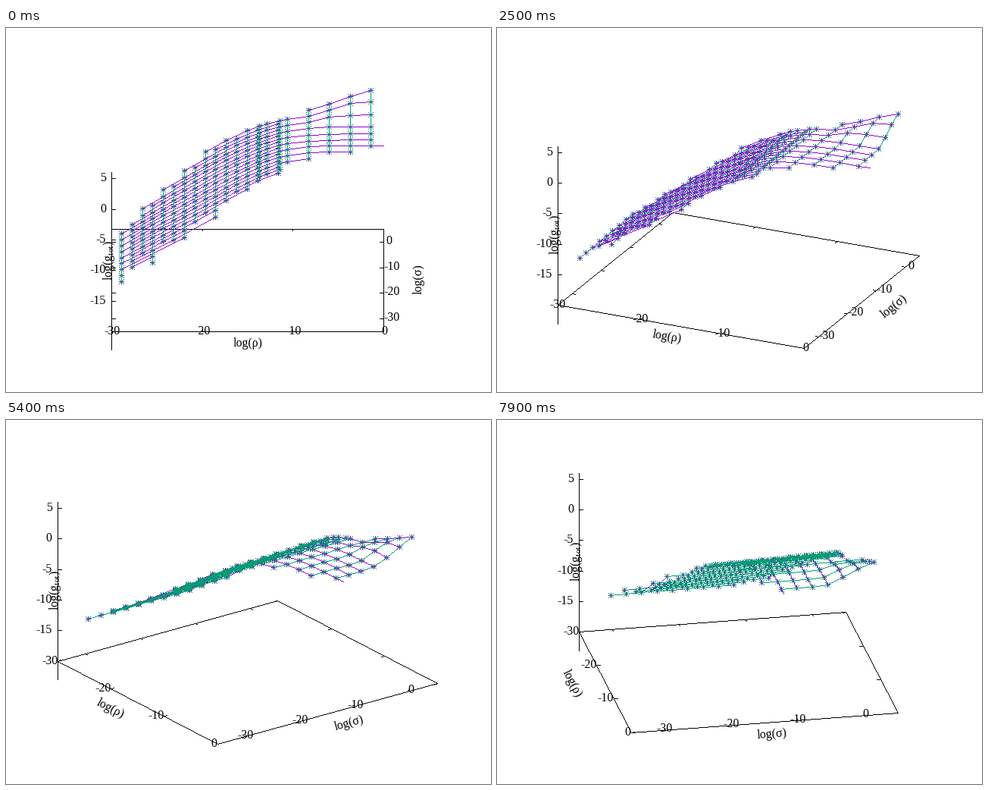
A matplotlib script that plays this animation: 640 px wide and 480 px high, repeating every 8000 ms.

```python
import numpy as np
import matplotlib.pyplot as plt
from matplotlib.animation import FuncAnimation

plt.rcParams.update({
    "font.family": "Liberation Serif",
    "font.size": 11.52,
    "mathtext.fontset": "custom",
    "mathtext.rm": "Liberation Serif",
})

W, H, DPI = 640, 480, 100
FRAMES, INTERVAL = 80, 100
BLACK, PURPLE, GREEN = (0, 0, 0), (148, 0, 211), (0, 158, 115)

CX, CY = 318.5, 332.5      # centre of the base square
RX, RY = 179.5, 67.5       # half side, and half side after the tilt
ZUNIT = 8.06               # pixels per unit of height
X0, STEP = 152, 13.83      # first column and column spacing at angle zero
TICK = 5 / RX


def row_v(j):
    return 0.835 - 0.1151 * j


def height(x, j):
    """Ramp that levels off along rho, plus a rise in the far corner."""
    n, v = (x - X0) / STEP, row_v(j)
    s = 13
    ramp = 168 - s * np.log1p(np.exp((116 - 7.9 * n) / s))
    tilt = 10 * (v - 0.1) * np.exp(-((n - 8) / 6) ** 2)
    by_sigma, by_rho, s = 28.5 - 9.6 * j, 0.363 * (x - 400) - 1.5, 2.5
    rise = s * np.log1p(1 / (np.exp(-by_sigma / s) + np.exp(-by_rho / s)))
    return ramp + tilt + rise


def row_range(x, shift):
    """Sigma rows covered by a column; the low edge is ragged."""
    n = (x - X0) / STEP
    ragged = 1.6 * np.cos(2 * np.pi * n / 3) * np.exp(-(n / 10) ** 2)
    first = max(int(n < 17), round(5.5 - 0.53 * n))
    last = round(12.7 - 0.27 * n + ragged)
    return np.arange(first, last + 1) + shift


# Three overlapping sets of columns; odd ones of the first sit half a row off
columns = [(X0 + STEP * k, k % 2 / 2) for k in [*range(14), 15]]
columns += [(481 - 27.4 * k, 0) for k in range(6)]
columns += [(361 - 27.5 * k, 0) for k in range(2)]

col_lines, rows = [], {}
for x, shift in sorted(columns):
    col = [((x - CX) / RX, row_v(j), height(x, j)) for j in row_range(x, shift)]
    col_lines.append(np.array(col))
    for j, p in zip(row_range(x, shift), col):
        rows.setdefault(j, []).append(p)
rows[6].append((1, row_v(6), rows[6][-1][2]))   # runs on to rho = 0
row_lines = [np.array(r) for r in rows.values()]
nodes = np.concatenate(col_lines)


def project(u, v, h, a):
    c, s = np.cos(a), np.sin(a)
    return np.array([CX + RX * (u * c + v * s), CY + RY * (u * s - v * c) - h])


def stroke(img, p, q, color):
    """Hard one-pixel line."""
    p, q = np.rint(p), np.rint(q)
    n = int(max(abs(q - p))) + 1
    x, y = np.rint(np.linspace(p, q, n)).astype(int).T
    img[y, x] = color


def polylines(img, lines, color, a):
    for line in lines:
        pts = project(*line.T, a).T
        for p, q in zip(pts, pts[1:]):
            stroke(img, p, q, color)


def marks(img, arms, color, a):
    x, y = np.rint(project(*nodes.T, a)).astype(int)
    for dx, dy in arms:
        for r in range(-3, 4):
            img[y + r * dy, x + r * dx] = color


fig = plt.figure(figsize=(W / DPI, H / DPI), dpi=DPI, facecolor="white")
ax = fig.add_axes([0, 0, 1, 1])
ax.axis("off")
canvas = ax.imshow(np.full((H, W, 3), 255, np.uint8), aspect="auto",
                   interpolation="nearest")


def label(s, ha="center"):
    return ax.text(0, 0, s, ha=ha, va="baseline", rotation_mode="anchor")


def tick_text(n):
    return f"{n}" if n < 0 else f" {n}"


x_ticks = [(n / 15 + 1, label(tick_text(n))) for n in range(-30, 1, 10)]
y_ticks = [((n + 15) / 20, label(tick_text(n))) for n in range(-30, 1, 10)]
z_ticks = [((n + 20) * ZUNIT, label(str(n), "right")) for n in range(-15, 6, 5)]
x_title, y_title = label("log(ρ)"), label("log(σ)")
z_title = label(r"$\mathrm{log(g_{tot})}$")
z_title.set_rotation(90)


def place_title(text, x, y, angle):
    text.set_position((x + 4 * np.sin(angle), y + 4 * np.cos(angle)))
    text.set_rotation(np.degrees(angle))


def update(i):
    a = np.radians(i)
    c, s = np.cos(a), np.sin(a)
    img = np.full((H, W, 3), 255, np.uint8)

    def base_line(u0, v0, u1, v1):
        stroke(img, project(u0, v0, 0, a), project(u1, v1, 0, a), BLACK)

    for e in (-1, 1):
        base_line(-1, e, 1, e)
        base_line(e, -1, e, 1)
        for u, _ in x_ticks:
            base_line(u, e, u, e * (1 - TICK))
        for v, _ in y_ticks:
            base_line(e, v, e * (1 - TICK), v)

    for u, text in x_ticks:
        x, y = project(u, -1, 0, a)
        text.set_position((x, y + 3.5))
        text.set_ha("right" if s > 0.8 else "center")
    for v, text in y_ticks:
        x, y = project(1, v, 0, a)
        text.set_position((x, y + 2.5))
        text.set_ha("left" if c > 0.8 else "center")

    zx, zy = corner = project(-1, -1, 0, a)
    stroke(img, corner + (0, 24.5), corner - (0, 26 * ZUNIT), BLACK)
    for h, text in z_ticks:
        stroke(img, corner - (0, h), corner + (5, -h), BLACK)
        text.set_position((zx - 7.5, zy - h + 3.5))
    z_title.set_position((zx + 0.5, zy - 93.5))

    x, y = project(0, -1.25, 0, a)
    place_title(x_title, x, y - 1.5, -np.arctan2(RY * s, RX * c))
    x, y = project(1.25, 0, 0, a)
    place_title(y_title, x + 1.5, y - 1.5, np.arctan2(RY * c, RX * s))

    polylines(img, row_lines, PURPLE, a)
    marks(img, [(1, 0), (0, 1)], PURPLE, a)
    polylines(img, col_lines, GREEN, a)
    marks(img, [(1, 1), (1, -1)], GREEN, a)
    canvas.set_data(img)
    return []


anim = FuncAnimation(fig, update, frames=FRAMES, interval=INTERVAL,
                     repeat=True, repeat_delay=0, blit=False)
plt.show()
```
